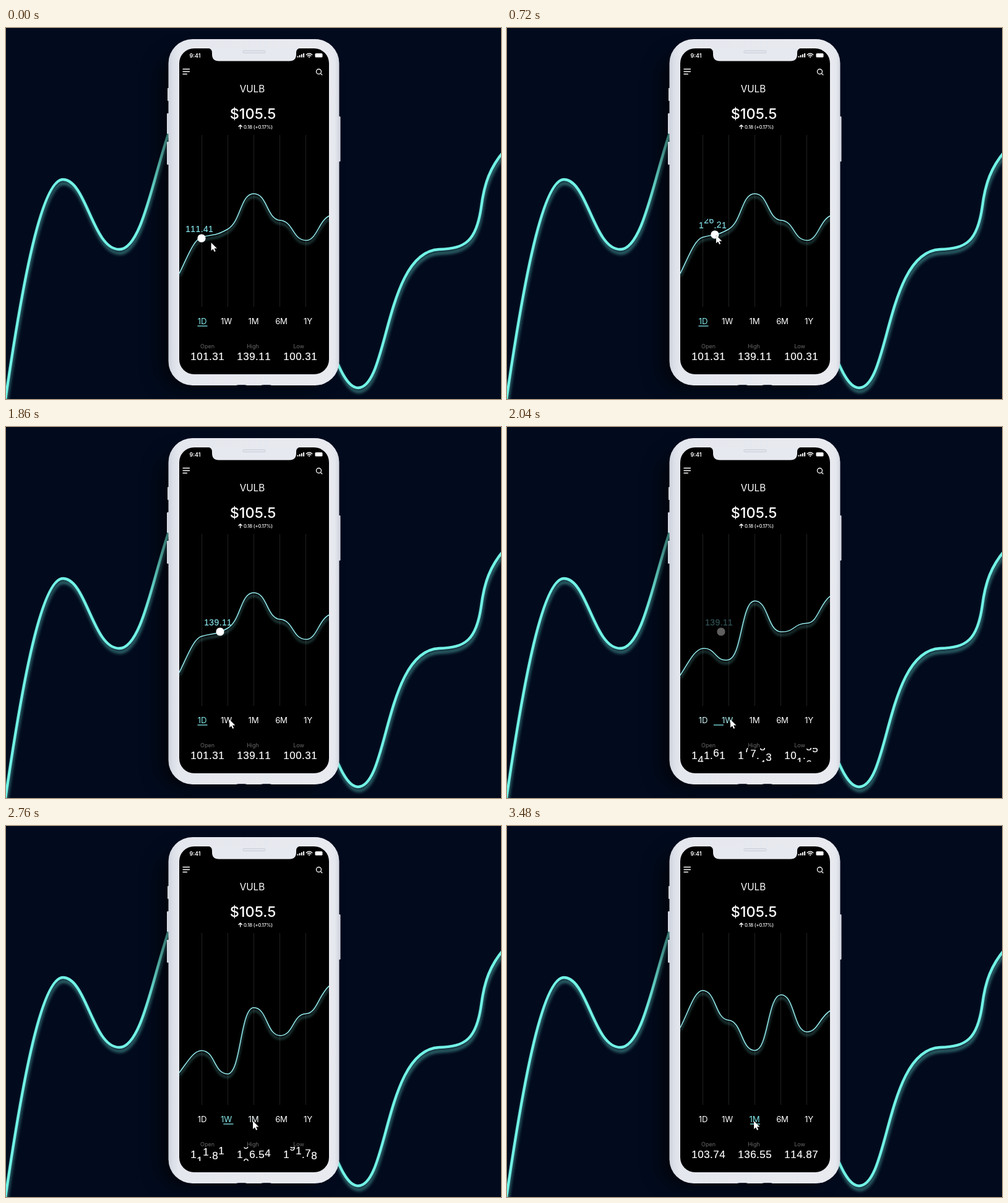
An HTML page for the animation above (3.54 s loop, 800 px wide and 600 px high).

```html
<!DOCTYPE html>
<html lang="en">
<head>
<meta charset="utf-8">
<title>Stock chart</title>
<style>
  html, body { margin: 0; width: 100%; height: 100%; overflow: hidden; background: #020b1e; }
  svg { display: block; width: 800px; height: 600px; }
  text { font-family: Inter, "Open Sans", sans-serif; fill: #fff; text-anchor: middle; }
  .count text { font-family: "Liberation Sans", Arial, sans-serif; fill: inherit; }
  .tabs text { font-size: 13.2px; letter-spacing: -.2px; }
  .heads text { font-size: 9px; fill: #686868; }
  .line { fill: none; stroke-linecap: round; stroke-linejoin: round; }
  .wave { stroke: #72f3e6; stroke-width: 4.3; filter: drop-shadow(1px 6px 2.5px rgba(114, 243, 230, .5)); }
  .chart { stroke: #96edf0; stroke-width: 1.5; filter: drop-shadow(0 5px 2px rgba(126, 235, 235, .65)); }
  .icon { fill: none; stroke: #fff; stroke-width: 1.3; stroke-linecap: round; }
</style>
</head>
<body>
<svg viewBox="0 0 800 600">
  <defs>
    <linearGradient id="shell">
      <stop offset="0" stop-color="#cdd2dc"/>
      <stop offset=".025" stop-color="#dbdfe7"/>
      <stop offset=".06" stop-color="#e5e7ee"/>
      <stop offset=".94" stop-color="#e8eaf0"/>
      <stop offset=".975" stop-color="#e6e8ef"/>
      <stop offset="1" stop-color="#d2d5de"/>
    </linearGradient>
    <filter id="soft" x="-40%" y="-20%" width="180%" height="140%"><feGaussianBlur stdDeviation="15"/></filter>
    <clipPath id="screen"><rect x="280" y="33" width="242" height="527" rx="24"/></clipPath>
  </defs>

  <rect width="800" height="600" fill="#020b1e"/>
  <path class="line wave" d="M-4 622C22 440 55 245 92 245C130 245 140 358 183 358C222 358 240 225 270 150"/>
  <path class="line wave" d="M525 515C538 550 552 582 569 582C618 582 612 362 700 358C742 357 760 345 768 290C773 250 783 225 804 200"/>
  <rect x="246" y="40" width="270" height="545" rx="38" fill="#000" opacity=".6" filter="url(#soft)"/>

  <g fill="#d5d8e1">
    <rect x="261" y="97" width="4" height="21" rx="1"/>
    <rect x="260" y="138" width="5" height="33" rx="1"/>
    <rect x="260" y="184" width="5" height="37" rx="1"/>
    <rect x="536" y="143" width="4.500" height="73" rx="1"/>
  </g>
  <rect x="262.5" y="18" width="276" height="560" rx="39" fill="url(#shell)"/>
  <path d="M372 578q2-1 5-1h8q3 0 4 1zM412 578q2-1 5-1h8q3 0 4 1z" fill="#31343f"/>
  <rect x="280" y="33" width="242" height="527" rx="24"/>
  <path d="M326 32.5Q333 33 333 40V42.500Q333 53.500 344 53.500H458Q469 53.500 469 42.500V40Q469 33 476 32.5Z" fill="#e7e9f0"/>
  <rect x="383" y="36.500" width="36" height="4" rx="1.500" fill="#e0e3ea" stroke="#c6c9d3" stroke-width=".8"/>

  <text x="305.500" y="48" font-size="9" font-weight="600">9:41</text>
  <path d="M470.500 45.500h2v2h-2zM473.700 44h2v3.500h-2zM476.900 42.500h2v5h-2zM480.100 41h2v6.500h-2z" fill="#fff"/>
  <path class="icon" d="M485.300 43.300q4.700-4.200 9.400 0M487.200 45.200q2.800-2.400 5.600 0"/>
  <circle cx="490" cy="46.800" r="1.100" fill="#fff"/>
  <rect x="499.500" y="41" width="12" height="6.500" rx="1.500" fill="#fff"/>
  <path class="icon" d="M286 66.500h10.500M286 70.500h10.500M286 74.500h6.500"/>
  <path class="icon" d="M508.600 73.600l2.200 2.200"/>
  <circle class="icon" cx="505.500" cy="70.500" r="4"/>

  <text x="398" y="104" font-size="15.300" font-weight="400">VULB</text>
  <text x="399" y="147" font-size="23.500" font-weight="500">$105.5</text>
  <path class="icon" stroke-width="1" d="M378.700 163v-6M376 159.500l2.700-2.700 2.700 2.700"/>
  <text x="407.500" y="163.300" font-size="7.700" font-weight="500" letter-spacing="-.15">0.18 (+0.17%)</text>

  <path d="M316.500 173V451M358.500 173V451M400.500 173V451M442.500 173V451M484.500 173V451" stroke="#202122"/>
  <g clip-path="url(#screen)"><path class="line chart" id="chart"/></g>

  <g class="tabs" id="tabs"></g>
  <rect id="bar" y="481.300" width="16" height="1.300" fill="#83e8ea"/>
  <g class="heads">
    <text x="325.500" y="518">Open</text>
    <text x="399" y="518">High</text>
    <text x="473" y="518">Low</text>
  </g>
  <g id="stats"></g>
  <g id="marker">
    <circle r="6.600" fill="#fff"/>
  </g>
  <path id="cursor" d="M0 0V13.300L3.100 10.500L5.200 15L7.300 14L5.200 9.600H9.600Z" fill="#fff" stroke="#000" stroke-opacity=".35" stroke-width=".5"/>
</svg>
<script>
const LOOP = 3540;
const $ = id => document.getElementById(id);
const mix = (a, b, p) => a + (b - a) * p;
const span = (t, from, to) => Math.min(1, Math.max(0, (t - from) / (to - from)));
const inOut = u => u < .5 ? 4 * u ** 3 : 1 - 4 * (1 - u) ** 3;
const outQuad = u => 1 - (1 - u) ** 2;

function add(parent, tag, attrs, text = '') {
  const el = document.createElementNS('http://www.w3.org/2000/svg', tag);
  for (const k in attrs) el.setAttribute(k, attrs[k]);
  el.textContent = text;
  parent.append(el);
  return el;
}

// Rolling counter: three digits, a point, two digits, behind one window.
function counter(parent, cx, y, size, fill) {
  const gap = size * .03, wide = size * .556 + gap, dot = size * .278 + gap, step = size * 1.65;
  const total = 5 * wide + dot - gap, id = 'win' + counter.n++;
  const clip = add(parent, 'clipPath', { id });
  add(clip, 'rect', { x: cx - total, y: y - size * 1.06, width: total * 2, height: size * 1.34 });
  const g = add(parent, 'g', {
    class: 'count', 'clip-path': `url(#${id})`, 'font-size': size, fill, stroke: fill, 'stroke-width': .2
  });
  const left = cx - total / 2;
  add(g, 'text', { x: left + 3 * wide + (dot - gap) / 2, y }, '.');
  const cols = [0, 1, 2, 3, 4].map(i => {
    const x = left + i * wide + (i > 2 ? dot : 0) + (wide - gap) / 2;
    return [add(g, 'text', { x }), add(g, 'text', { x })];
  });
  return values => cols.forEach((pair, i) => {
    const base = Math.floor(values[i] + 1e-6);
    pair.forEach((el, k) => {
      el.textContent = (base + k) % 10;
      el.setAttribute('y', y + (base + k - values[i]) * step);
    });
  });
}
counter.n = 0;

// Column positions per period; 10 is the zero at the far end of the reel.
const stats = [
  [325.5, [1, 10, 1, 3, 1], [1, 0, 1, 8, 1], [1, 10, 3, 7, 4]],
  [400.5, [1, 3, 9, 1, 1], [1, 10, 6, 5, 4], [1, 3, 6, 5, 5]],
  [475.5, [1, 10, 0, 3, 1], [1, 10, 1, 7, 8], [1, 1, 4, 8, 7]]
].map(([x, ...states]) => ({ states, show: counter($('stats'), x, 537, 17, '#fff') }));
const showPrice = counter($('marker'), -3.5, -10.5, 13.9, '#83dfe6');

const tabs = [['1D', 317], ['1W', 356], ['1M', 400], ['6M', 445], ['1Y', 488]]
  .map(([name, x]) => add($('tabs'), 'text', { x, y: 479 }, name));
const barX = [309.5, 348.5, 393];

// Chart heights and slopes at each knot for the three periods.
const knots = [280, 316, 358, 400.5, 443, 485, 522];
const heights = [
  [397, 338.5, 325.5, 268, 311, 343.5, 304],
  [404, 370, 407, 289, 343.5, 301.5, 256],
  [326, 266, 314, 363, 273, 333, 299]
];
const slopes = [
  [-2, -.3, -.55, 0, .08, 0, -.5],
  [-1.25, 0, 0, 0, 0, -.03, -.9],
  [-1.9, 0, .08, 0, 0, 0, -.6]
];

const blend = (list, a, p) => list[a].map((v, i) => mix(v, list[Math.min(2, a + 1)][i], p));

function curve(ys, ms) {
  let d = `M${knots[0]} ${ys[0]}`;
  for (let i = 1; i < knots.length; i++) {
    const h = i === 1 ? 13 : i === 6 ? 17 : 22;
    d += `C${knots[i - 1] + h} ${ys[i - 1] + ms[i - 1] * h} ${knots[i] - h} ${ys[i] - ms[i] * h} ${knots[i]} ${ys[i]}`;
  }
  return d;
}

function pointer(t, drag) {
  if (t < 530) {
    const p = inOut(span(t, 30, 450));
    return [mix(331.5, 318, p), mix(347, 341, p)];
  }
  if (t < 1095) return [318 + 30 * drag, 341 - 9 * drag];
  if (t < 2200) {
    const p = outQuad(span(t, 1095, 1810));
    return [mix(348, 361, p) + 32 * p * (1 - p), mix(332, 473, p)];
  }
  const p = inOut(span(t, 2200, 2620));
  return [mix(361, 399, p), mix(473, 477, p) + 20 * p * (1 - p)];
}

function draw(t) {
  const first = inOut(span(t, 1899, 2159));
  const second = inOut(span(t, 2695, 2955));
  const a = second > 0 ? 1 : 0, p = a ? second : first;

  $('chart').setAttribute('d', curve(blend(heights, a, p), blend(slopes, a, p)));
  stats.forEach(s => s.show(blend(s.states, a, p)));
  $('bar').setAttribute('x', mix(barX[a], barX[a + 1], p));
  tabs.forEach((el, i) => {
    const on = i === a ? 1 - p : i === a + 1 ? p : 0;
    el.style.fill = `rgb(${mix(255, 131, on)},${mix(255, 232, on)},${mix(255, 234, on)})`;
  });

  const drag = inOut(span(t, 530, 870));
  $('marker').setAttribute('transform', `translate(${316 + 30 * drag} ${340 - 9 * drag})`);
  $('marker').setAttribute('opacity', 1 - first);
  showPrice(blend([[1, 1, 1, 4, 1], [1, 3, 9, 1, 1]], 0, drag));
  $('cursor').setAttribute('transform', `translate(${pointer(t, drag).join(' ')})`);
}

function tick() {
  draw(performance.now() % LOOP);
  requestAnimationFrame(tick);
}
tick();
</script>
</body>
</html>
```
